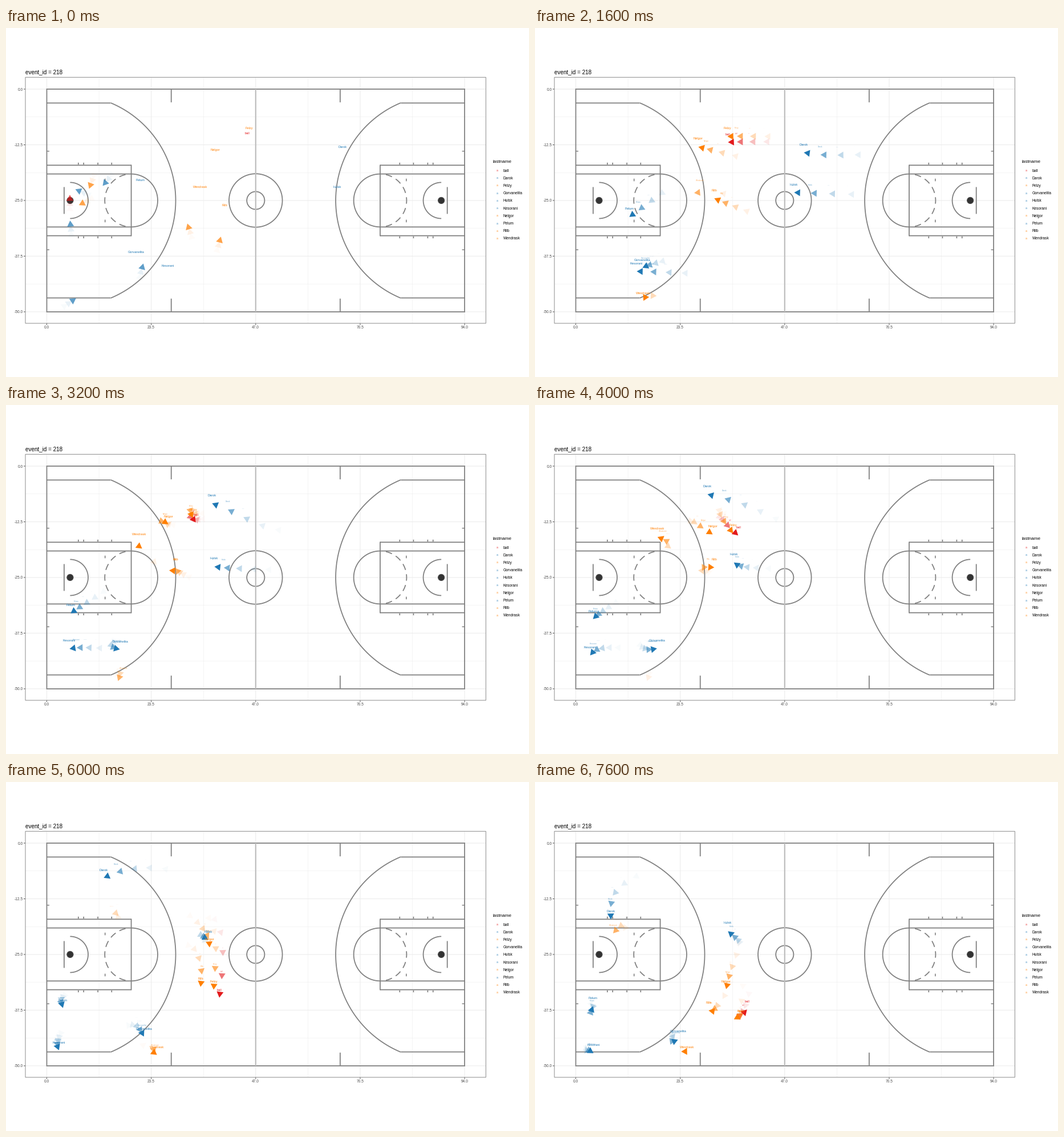
A matplotlib script that plays this animation: 917x611 px, repeating every 8000 ms.

```python
import numpy as np
import matplotlib.pyplot as plt
from matplotlib.animation import FuncAnimation
from matplotlib.patches import Arc, Circle, Polygon, Rectangle

W, H, DPI = 917, 611, 64
FRAMES, INTERVAL = 20, 400
PT = 72 / DPI  # points per pixel
RED, BLUE, ORANGE = "#e31a1c", "#1f78b4", "#ff7f00"
LINE, LINE_PX = "#7f7f7f", 1.75
KNOTS = np.array([0, 4, 8, 12, 15, 17, 19])
LABEL_PX, LABEL_RISE = 5.69, 14.5
ARROW_R, SETBACK = 6.9, 7.3
WAKE, REST, PACE = 4, 2, 9

plt.rcParams["font.family"] = "Liberation Sans"
fig = plt.figure(figsize=(W / DPI, H / DPI), dpi=DPI, facecolor="white")
ax = fig.add_axes([0, 0, 1, 1])
ax.set_xlim(0, W)
ax.set_ylim(H, 0)
ax.axis("off")


def line(x, y, color=LINE, width=LINE_PX, z=2):
    ax.plot(x, y, color=color, lw=width * PT, zorder=z, snap=False,
            solid_capstyle="butt")


def box(x0, y0, x1, y1, color, width, z):
    ax.add_patch(Rectangle((x0, y0), x1 - x0, y1 - y0, fill=False, ec=color,
                           lw=width * PT, zorder=z, snap=False))


def arc(x, y, r, start=0, stop=360):
    ax.add_patch(Arc((x, y), 2 * r, 2 * r, theta1=start, theta2=stop,
                     color=LINE, lw=LINE_PX * PT, zorder=2))


def text(x, y, s, px, color="black", ha="left", z=3, alpha=1):
    return ax.text(x, y, s, fontsize=px * PT, color=color, ha=ha,
                   va="center_baseline", zorder=z, alpha=alpha)


# ---- panel, grid and axes
LEFT, RIGHT, TOP, BOTTOM = 71.5, 804.1, 107, 496.9
MID_X, MID_Y = (LEFT + RIGHT) / 2, (TOP + BOTTOM) / 2
FOOT = (RIGHT - LEFT) / 94
for i in range(9):
    major = i % 2 == 0
    shade, width = ("#ebebeb", 1) if major else ("#ebebeb", 0.5)
    x = LEFT + (RIGHT - LEFT) * i / 8
    y = TOP + (BOTTOM - TOP) * i / 8
    line([x, x], [87, 517], shade, width, 1)
    line([34, 841], [y, y], shade, width, 1)
    if major:
        line([x, x], [517, 520], "#555555", 1)
        line([31, 34], [y, y], "#555555", 1)
        text(x, 523.7, f"{11.75 * i:.1f}", 6.6, "#4d4d4d", "center")
        text(30, y, f"{-6.25 * i:.1f}" if i else "0.0", 6.6, "#4d4d4d", "right")
box(34, 86.3, 841.4, 517, "#8c8c8c", 1, 4)
text(34, 76, "event_id = 218", 9.85)

# ---- court
box(LEFT, TOP, RIGHT, BOTTOM, LINE, LINE_PX, 2)
line([MID_X, MID_X], [TOP, BOTTOM], "#bebebe", 2.2, 3)
arc(MID_X, MID_Y, 6 * FOOT)
arc(MID_X, MID_Y, 2 * FOOT)


def half_court(side):
    """Draw one half; side is 1 for the left half and -1 for the right."""
    hoop, lane = LEFT + 5.25 * FOOT, LEFT + 19 * FOOT

    def fx(x):
        return MID_X + side * (np.asarray(x) - MID_X)

    def seg(x0, x1, dy0, dy1, width=LINE_PX):
        for s in (-1, 1):
            line(fx([x0, x1]), [MID_Y + s * dy0, MID_Y + s * dy1], width=width)

    def curve(x, r, middle, spread):
        a = np.radians(middle + np.linspace(-spread, spread, 80))
        line(fx(x + r * np.cos(a)), MID_Y + r * np.sin(a))

    seg(LEFT, hoop + 9.1 * FOOT, 170.6, 170.6)
    seg(LEFT + 28 * FOOT, LEFT + 28 * FOOT, 171.8, 195)
    seg(LEFT, lane, 61.7, 61.7)
    seg(LEFT, lane, 46.4, 46.4)
    seg(lane, lane, 0, 62.5)
    seg(LEFT, LEFT + 4.5, 86.3, 86.3, 1.4)
    seg(173.7, 173.7, 33.7, 38.2, 1.6)
    for feet in (7.1, 8.3, 11.5, 14.6):
        seg(LEFT + feet * FOOT, LEFT + feet * FOOT, 62.8, 66.2)
    seg(LEFT + 3.9 * FOOT, LEFT + 3.9 * FOOT, 0, 23.5)
    curve(hoop, 23.75 * FOOT, 0, 67.4)
    curve(hoop, 4.05 * FOOT, 0, 90)
    curve(lane, 5.95 * FOOT, 0, 90)
    for k in range(-3, 4):
        curve(lane, 5.95 * FOOT, 180 + 23.5 * k, 7)
    ax.add_patch(Circle((fx(hoop), MID_Y), 5.6, fc="#333333", ec="#4d4d4d",
                        lw=PT, zorder=2))


half_court(1)
half_court(-1)

# ---- tracks
tracks = []


def unit(v):
    return v / max(np.hypot(*v), 1e-6)


def spline(*points):
    """Position at every frame on a smooth curve through the key points."""
    p = np.array(points, float)
    slope = np.gradient(p, KNOTS, axis=0)
    t = np.arange(FRAMES)
    i = np.clip(np.searchsorted(KNOTS, t, "right") - 1, 0, len(KNOTS) - 2)
    step = (KNOTS[i + 1] - KNOTS[i])[:, None]
    u = (t - KNOTS[i])[:, None] / step
    return ((1 + 2 * u) * (1 - u) ** 2 * p[i] + u * (1 - u) ** 2 * step * slope[i]
            + u * u * (3 - 2 * u) * p[i + 1] + u * u * (u - 1) * step * slope[i + 1])


def track(name, color, last, degrees, path):
    """last and degrees give the final place and heading in the play before."""
    a = np.radians(degrees)
    heading = np.array([np.cos(a), -np.sin(a)])
    tracks.append((name, color, np.array(last, float), heading, path))


track("ball", RED, (112, 299), 90, spline(
    (423, 199), (338, 200), (333, 206), (379, 270), (374, 378), (361, 408),
    (372, 398)))
track("Darok", BLUE, (174, 271), 230, spline(
    (590, 222), (471, 218), (361, 172), (245, 150), (171, 168), (136, 199),
    (133, 241)))
track("Felzy", ORANGE, (148, 275), 250, spline(
    (426, 190), (337, 190), (328, 198), (367, 268), (364, 364), (360, 410),
    (361, 416)))
track("Gorvanelita", BLUE, (239, 419), 75, spline(
    (228, 407), (188, 420), (200, 428), (229, 427), (242, 446), (244, 453),
    (251, 451)))
track("Hulsk", BLUE, (128, 285), 157, spline(
    (581, 292), (454, 288), (365, 283), (345, 270), (355, 276), (351, 272),
    (338, 261)))
track("Kesorani", BLUE, (117, 477), 34, spline(
    (284, 430), (178, 426), (111, 427), (91, 453), (93, 470), (98, 472),
    (103, 475)))
track("Nelgor", ORANGE, (134, 307), 207, spline(
    (367, 228), (286, 208), (285, 209), (341, 251), (357, 290), (343, 330),
    (335, 363)))
track("Pelum", BLUE, (113, 344), 95, spline(
    (235, 280), (165, 331), (113, 365), (97, 383), (100, 396), (99, 400),
    (102, 392)))
track("Rilb", ORANGE, (375, 372), 75, spline(
    (383, 325), (314, 298), (297, 284), (335, 298), (341, 359), (315, 397),
    (304, 400)))

# Two players share the last name, so its arrow jumps between them.
upper = spline((341, 292), (274, 276), (234, 240), (195, 229), (166, 242),
               (145, 256), (129, 275))
lower = spline((222, 470), (190, 478), (214, 474), (249, 468), (265, 478),
               (267, 478), (267, 478))
is_lower = np.isin(np.arange(FRAMES), [2, 4, 6, 7, 11, 14, 15, 19])
track("Wendrask", ORANGE, (320, 349), 107,
      np.where(is_lower[:, None], lower, upper))

# ---- legend
text(854, 234, "lastname", 8.1)
for row, (name, color, *_) in enumerate(tracks):
    y = 249 + 13.22 * row
    text(861.2, y, "a", 5.2, color, "center", alpha=0.8)
    text(872, y, name, 6.65)

# ---- animation
live = []


def fade(age):
    return 0.6 ** (age * (age + 3) / 4)


def arrow(center, heading, color, age):
    angles = np.arctan2(heading[1], heading[0]) + np.radians([0, 120, 240])
    corners = center + ARROW_R * np.column_stack([np.cos(angles), np.sin(angles)])
    live.append(ax.add_patch(Polygon(corners, fc=color, lw=0, zorder=10 - age,
                                     alpha=fade(age))))


def label(place, name, color, age):
    if age < WAKE:
        live.append(text(place[0], place[1] - LABEL_RISE, name,
                         LABEL_PX * 0.54 ** age, color, "center",
                         10.5 - age, fade(age)))


def update(frame):
    while live:
        live.pop().remove()
    for name, color, last, end_heading, path in tracks:
        for age in range(WAKE, -1, -1):
            t = frame - age
            if t > 0:
                heading = unit(path[t] - path[t - 1])
                arrow(path[t] - SETBACK * heading, heading, color, age)
            elif t < 0:
                back = PACE * max(0, -t - REST)
                arrow(last - back * end_heading, end_heading, color, age)
            if t >= 0:
                label(path[t], name, color, age)
    return live


anim = FuncAnimation(fig, update, frames=FRAMES, interval=INTERVAL,
                     repeat=True, repeat_delay=0, blit=False)
plt.show()
```
